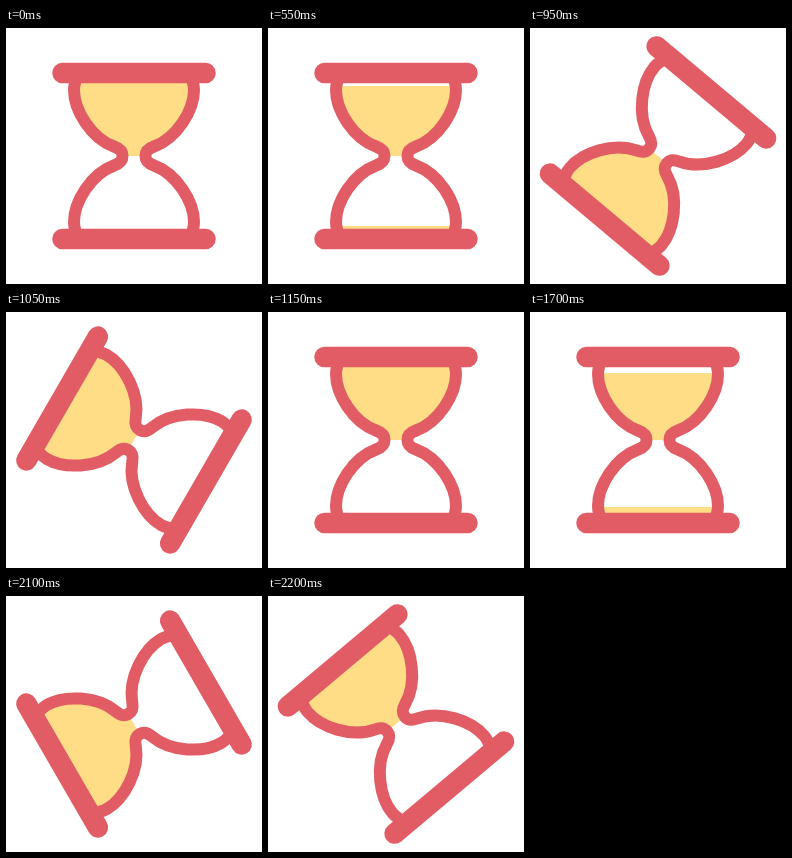
Write an HTML page that moves like this. It is 256x256 px and loops after 2.25 s.

```html
<!DOCTYPE html>
<html lang="en">
<head>
<meta charset="utf-8">
<title>Hourglass</title>
<style>
  html, body { margin: 0; width: 100%; height: 100%; overflow: hidden; background: #fff; }
  svg { display: block; width: 100%; height: 100%; }
</style>
</head>
<body>
<svg viewBox="-128 -128 256 256">
  <defs>
    <!-- One side of the glass, closed along the middle axis -->
    <path id="half" d="M0 -80 H-56 C-58 -78 -60 -71 -60 -66 C-60 -46 -43 -18 -20 -9.5
      C-13 -7 -11.5 -4 -11.5 0 C-11.5 4 -13 7 -20 9.5 C-43 18 -60 46 -60 66
      C-60 71 -58 78 -56 80 H0"/>
    <clipPath id="inside">
      <use href="#half"/>
      <use href="#half" transform="scale(-1 1)"/>
    </clipPath>
  </defs>
  <g id="glass">
    <g clip-path="url(#inside)" fill="#fedd86">
      <rect id="upper" x="-64" width="128"/>
      <rect id="lower" x="-64" width="128"/>
    </g>
    <g fill="none" stroke="#e15c64" stroke-width="12">
      <use href="#half"/>
      <use href="#half" transform="scale(-1 1)"/>
      <path d="M-71.5 -83 H71.5 M-71.5 83 H71.5" stroke-width="20.5" stroke-linecap="round"/>
    </g>
  </g>
</svg>
<script>
const LOOP = 2250, TURN = LOOP / 2, DRAINED = 900, STEP = 50;
const [glass, upper, lower] = ['glass', 'upper', 'lower'].map(id => document.getElementById(id));

function setSand(rect, top, bottom) {
  rect.setAttribute('y', top);
  rect.setAttribute('height', Math.max(0, bottom - top));
}

function draw() {
  // The motion advances in 20 steps per second; the offset absorbs clock rounding.
  const time = Math.floor(performance.now() / STEP + 0.1) * STEP % LOOP;
  const phase = time % TURN;

  // The level falls faster as the bulb narrows, then the glass turns over.
  const left = Math.max(0, DRAINED - phase);
  const level = Math.min(83, 67 * (left / 325) ** 0.59);
  setSand(upper, -level, 0);
  setSand(lower, level, 83);

  const angle = 180 * Math.max(0, phase - DRAINED) / (TURN - DRAINED);
  glass.setAttribute('transform', `rotate(${angle})`);
  requestAnimationFrame(draw);
}
draw();
</script>
</body>
</html>
```
